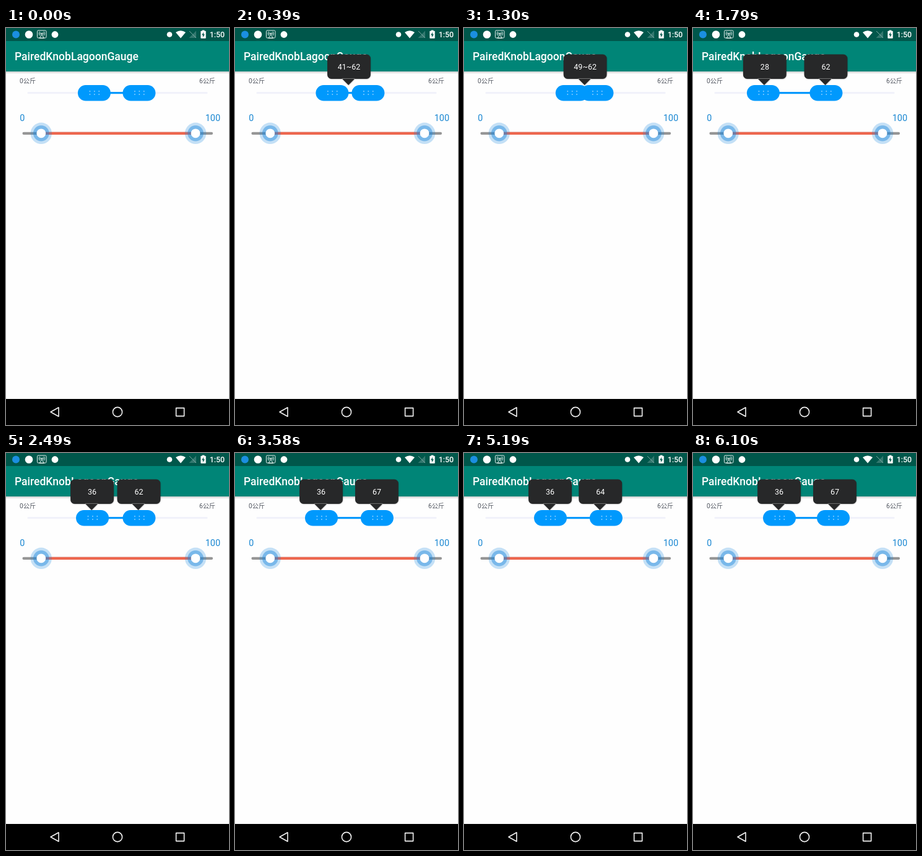
Write an HTML page with a canvas that moves like this. It is 360x640 px and loops after 6130 ms.

```html
<!DOCTYPE html>
<html lang="en">
<head>
<meta charset="utf-8">
<title>Range slider</title>
<style>
html, body { margin: 0; width: 100%; height: 100%; overflow: hidden; background: #fefefe; }
canvas { display: block; width: 360px; height: 640px; }
</style>
</head>
<body>
<canvas id="stage"></canvas>
<script>
const W = 360, H = 640, LOOP = 6130, STEP = 35;
const BLUE = '#0099fd';
const FONT = 'Roboto, "Noto Sans CJK SC", "Noto Sans CJK", sans-serif';
const canvas = document.getElementById('stage');
const dpr = window.devicePixelRatio || 1;
canvas.width = W * dpr;
canvas.height = H * dpr;
const ctx = canvas.getContext('2d');
ctx.scale(dpr, dpr);

// Drag paths: [step, value]
const leftPath = [[-1, 37], [20, 46], [21, 47], [27, 53], [30, 54], [33, 52],
  [49, 28], [50, 27], [55, 21], [58, 20], [61, 23], [69, 36]];
const rightPath = [[82, 62], [91, 73], [94, 73], [100, 67], [101, 67], [118, 47],
  [121, 36], [135, 36], [151, 77], [154, 77], [155, 76], [161, 76], [173, 66]];

function valueAt(path, step) {
  if (step <= path[0][0]) return path[0][1];
  for (let i = 1; i < path.length; i++) {
    const [a, va] = path[i - 1], [b, vb] = path[i];
    if (step <= b) return Math.round(va + (vb - va) * (step - a) / (b - a));
  }
  return path[path.length - 1][1];
}

const knobX = v => 139.5 + (v - 36) * 2.9;

function fillRect(x, y, w, h, color) {
  ctx.fillStyle = color;
  ctx.fillRect(x, y, w, h);
}

function roundRect(x, y, w, h, r, color) {
  ctx.fillStyle = color;
  ctx.beginPath();
  ctx.roundRect(x, y, w, h, r);
  ctx.fill();
}

function disc(x, y, r, color) {
  ctx.fillStyle = color;
  ctx.beginPath();
  ctx.arc(x, y, r, 0, Math.PI * 2);
  ctx.fill();
}

function poly(points, color, stroke) {
  ctx.beginPath();
  points.forEach(([x, y]) => ctx.lineTo(x, y));
  ctx.closePath();
  if (stroke) {
    ctx.strokeStyle = color;
    ctx.lineWidth = stroke;
    ctx.stroke();
  } else {
    ctx.fillStyle = color;
    ctx.fill();
  }
}

function text(str, x, y, size, color, align = 'left', weight = 400) {
  ctx.font = `${weight} ${size}px ${FONT}`;
  ctx.textAlign = align;
  ctx.fillStyle = color;
  ctx.fillText(str, x, y);
}

function castIcon() {
  ctx.strokeStyle = '#e6efed';
  ctx.lineWidth = 1;
  ctx.beginPath();
  ctx.roundRect(50.5, 4, 14.5, 12, 1.5);
  ctx.stroke();
  for (const r of [2.6, 4.6]) {
    ctx.beginPath();
    ctx.arc(57.8, 9, r, -0.8, 0.8);
    ctx.stroke();
    ctx.beginPath();
    ctx.arc(57.8, 9, r, Math.PI - 0.8, Math.PI + 0.8);
    ctx.stroke();
  }
  disc(57.8, 9, 1.2, '#e6efed');
  poly([[57.8, 10.5], [61.5, 16.5], [54, 16.5]], '#e6efed', 1);
}

function statusBar() {
  fillRect(0, 0, W, 21, '#00574b');
  disc(16, 10.5, 6, '#1b8fe0');
  disc(37, 10.5, 6.3, '#fff');
  castIcon();
  disc(79, 10.5, 5.4, '#fff');
  disc(264, 10.5, 4.3, '#fff');

  ctx.fillStyle = '#fff';
  ctx.beginPath();
  ctx.moveTo(282, 16.5);
  ctx.lineTo(274, 7);
  ctx.quadraticCurveTo(282, 1.5, 290, 7);
  ctx.closePath();
  ctx.fill();

  poly([[307, 4.5], [307, 16], [295.5, 16]], '#33786f');
  ctx.strokeStyle = '#7ca9a3';
  ctx.lineWidth = 1;
  ctx.beginPath();
  ctx.moveTo(296, 5);
  ctx.lineTo(307, 16);
  ctx.stroke();

  fillRect(316.6, 3.5, 3.8, 2, '#fff');
  roundRect(314.3, 4.8, 8.4, 12, 0.8, '#fff');
  poly([[319.2, 6.5], [316, 11.5], [318, 11.5], [317.7, 15.2], [320.9, 10.2], [318.9, 10.2]], '#00574b');
  text('1:50', 353, 15, 12.3, '#fff', 'right', 500);
}

function appBar() {
  const g = ctx.createLinearGradient(0, 70, 0, 74);
  g.addColorStop(0, 'rgba(0,0,0,.2)');
  g.addColorStop(1, 'rgba(0,0,0,0)');
  fillRect(0, 70, W, 4, g);
  fillRect(0, 21, W, 49, '#008577');
  text('PairedKnobLagoonGauge', 14, 52, 17.5, '#fff', 'left', 500);
}

function navBar() {
  fillRect(0, 598, W, 42, '#000');
  ctx.lineJoin = 'round';
  poly([[72, 619], [85, 611.8], [85, 626.2]], '#f2f2f2', 1.6);
  ctx.strokeStyle = '#f2f2f2';
  ctx.beginPath();
  ctx.arc(180, 619, 7.6, 0, Math.PI * 2);
  ctx.stroke();
  ctx.strokeRect(274.6, 612.6, 13, 13);
}

function lowerSlider() {
  text('0', 22.2, 149.5, 14.4, '#1b88d2');
  text('100', 346, 149.5, 14.4, '#1b88d2', 'right');
  roundRect(26.5, 167.7, 307.5, 4.3, 2.1, '#969696');
  fillRect(57, 167.7, 249, 4.3, '#ed674f');
  for (const x of [56.8, 306]) {
    disc(x, 169.8, 17.2, 'rgba(30,136,220,.26)');
    disc(x, 169.8, 12.8, 'rgba(30,136,220,.45)');
    disc(x, 169.8, 7.4, '#fff');
  }
}

function knob(x) {
  roundRect(x - 26.5, 92, 53, 25.6, 12.8, BLUE);
  for (const dx of [-7, 0.4, 7.8])
    for (const y of [102, 107]) disc(x + dx, y, 0.95, '#8fd0ff');
}

function bubble(x, label) {
  ctx.save();
  ctx.shadowColor = 'rgba(0,0,0,.3)';
  ctx.shadowBlur = 1.5 * dpr;
  ctx.shadowOffsetX = ctx.shadowOffsetY = 0.5 * dpr;
  ctx.fillStyle = '#272829';
  ctx.beginPath();
  ctx.roundRect(x - 35, 42.5, 69.8, 39.5, 6.5);
  ctx.moveTo(x - 11.5, 81.5);
  ctx.lineTo(x - 1, 92);
  ctx.lineTo(x + 9.5, 81.5);
  ctx.fill();
  ctx.restore();
  text(label, x, 67, 12.5, '#fff', 'center');
}

function upperSlider(step) {
  const left = knobX(valueAt(leftPath, step));
  const right = knobX(valueAt(rightPath, step));
  text('0公斤', 22, 88.8, 10.2, '#50555f');
  text('6公斤', 338, 88.8, 10.2, '#50555f', 'right');
  roundRect(34.5, 103, 291, 3.2, 1.6, '#f1f2fa');
  fillRect(left, 103, right - left, 3.2, BLUE);
  knob(right);
  knob(left);
  if (step < 0) return;

  // Labels trail the knobs by one step
  const lo = valueAt(leftPath, step - 1), hi = valueAt(rightPath, step - 1);
  if (hi - lo < 24) {
    bubble(knobX((lo + hi) / 2) - 0.4, `${lo}~${hi}`);
  } else {
    bubble(knobX(lo) - 0.4, lo);
    bubble(knobX(hi) - 0.4, hi);
  }
}

function draw(now) {
  const t = now % LOOP;
  const step = t < 40 ? -1 : Math.floor((t - 35) / STEP);
  fillRect(0, 0, W, H, '#fefefe');
  statusBar();
  appBar();
  lowerSlider();
  upperSlider(step);
  navBar();
}

let start = null;
function tick(now) {
  if (start === null) start = now;
  draw(now - start);
  requestAnimationFrame(tick);
}
draw(0);
requestAnimationFrame(tick);
</script>
</body>
</html>
```
